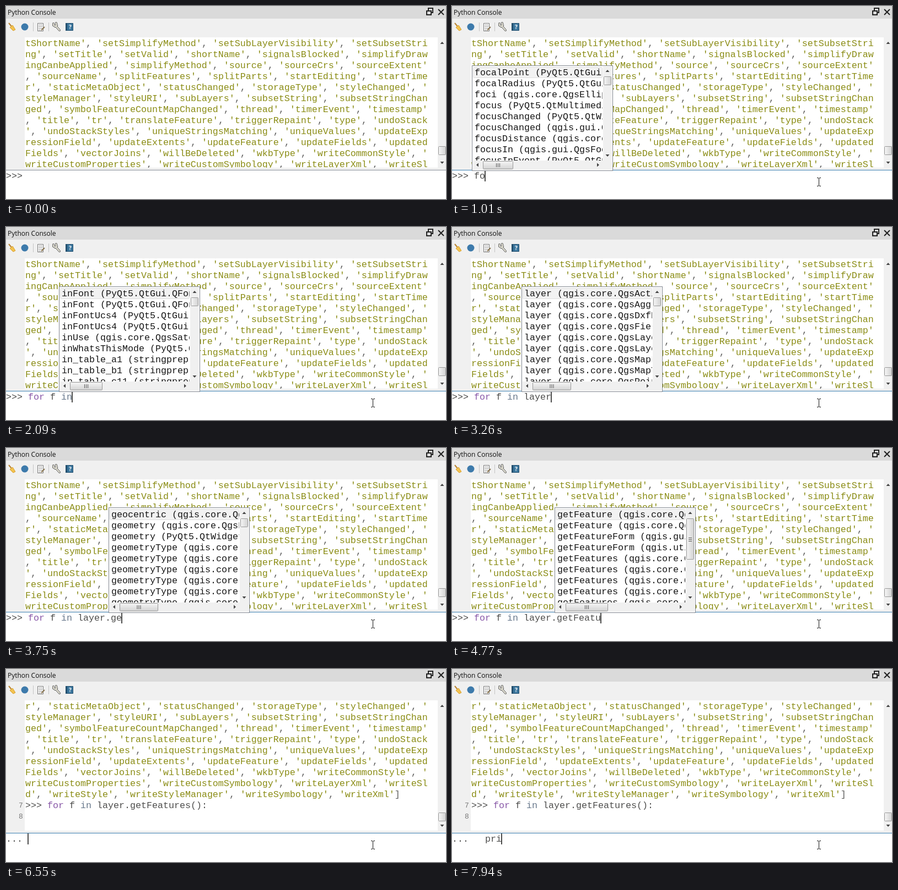
Write an HTML page that moves like this. It is 798 px wide and 351 px high and loops after 8 s.

```html
<!DOCTYPE html>
<html lang="en">
<head>
<meta charset="utf-8">
<title>Python Console</title>
<style>
html, body { margin: 0; width: 100%; height: 100%; overflow: hidden; background: #fff; }
svg { display: block; }
text { font: 16.664px "Liberation Mono", "Courier New", monospace; white-space: pre; fill: #4d4d4c; }
.ui { font: 12px "Open Sans", "Noto Sans", sans-serif; fill: #111; }
.num { font-size: 13px; fill: #777; }
.str { fill: #8a8c14; }
.op { fill: #5c5c5b; }
.kw { fill: #8959a8; }
.in { fill: #68788c; }
.bad { fill: #f00; }
.match { fill: #00f; }
.item { fill: #161616; }
.tip { fill: #8c8c8c; }
</style>
</head>
<body>
<svg width="798" height="351" viewBox="0 0 798 351">
  <defs>
    <linearGradient id="thumbV"><stop stop-color="#f6f6f6"/><stop offset="1" stop-color="#d2d2d2"/></linearGradient>
    <linearGradient id="thumbH" x2="0" y2="1"><stop stop-color="#f6f6f6"/><stop offset="1" stop-color="#d2d2d2"/></linearGradient>
    <clipPath id="page"><path d="M0 57H783V294H0z"/></clipPath>
    <clipPath id="rows"><path d="M2 2H237V173H2z"/></clipPath>
  </defs>
  <path fill="#f0f0f0" d="M0 0H798V298H0z"/>
  <path fill="#dadada" d="M0 0H798V23H0z"/>
  <text class="ui" x="3" y="16">Python Console</text>
  <g fill="none" stroke="#222" stroke-width="2">
    <path d="M766 8V4H774V12H771M763 9H771V16H763z"/>
    <path d="M784 6L794 16M794 6L784 16"/>
  </g>
  <!-- toolbar -->
  <path d="M5 31L10 37" stroke="#b98432" stroke-width="2"/>
  <path fill="#f2c250" stroke="#d9a02c" d="M7 39L12 35L17 43L13 45z"/>
  <circle cx="34" cy="38" r="6.5" fill="#3d7aab"/>
  <path stroke="#c4c4c4" d="M49.5 30V46M77.5 30V46"/>
  <path fill="#fff" stroke="#777" d="M57.5 31.5H67.5V45.5H57.5z"/>
  <path stroke="#999" d="M59 34.5H66M59 37.5H66M59 40.5H66M59 43.5H63"/>
  <path stroke="#8a7550" stroke-width="2" d="M64 44L70 38"/>
  <g fill="none" stroke-linecap="round">
    <path stroke="#666" stroke-width="4" d="M90 36L97 44M86 32V35L89 37L92 35L91 31"/>
    <path stroke="#e8e6d8" stroke-width="2" d="M90 36L97 44M86 32V35L89 37L92 35L91 31"/>
  </g>
  <path fill="#3a759c" stroke="#24506f" d="M108.5 31.5H121.5V44.5H108.5z"/>
  <path fill="#24506f" d="M108 31H111V45H108z"/>
  <text class="ui" x="114" y="42" style="fill:#fff;font-size:10px;font-weight:bold">?</text>
  <!-- output and input -->
  <path fill="#fff" d="M34 57H783V294H34zM0 298H798V351H0z"/>
  <g id="view"></g>
</svg>
<script>
const names = `tShortName setSimplifyMethod setSubLayerVisibility setSubsetString setTitle setValid shortName
signalsBlocked simplifyDrawingCanbeApplied simplifyMethod source sourceCrs sourceExtent sourceName splitFeatures
splitParts startEditing startTimer staticMetaObject statusChanged storageType styleChanged styleManager styleURI
subLayers subsetString subsetStringChanged symbolFeatureCountMapChanged thread timerEvent timestamp title tr
translateFeature triggerRepaint type undoStack undoStackStyles uniqueStringsMatching uniqueValues
updateExpressionField updateExtents updateFeature updateFields updatedFields vectorJoins willBeDeleted wkbType
writeCommonStyle writeCustomProperties writeCustomSymbology writeLayerXml writeSld writeStyle writeStyleManager
writeSymbology writeXml`;
const lines = (names.split(/\s+/).join("', '") + "']").match(/.{1,73}/g);

const rep = (s, n) => Array(n).fill(s);
const core = (name, classes) => classes.split(' ').map(c => `${name} (qgis.core.Qgs${c}`);
const layers = core('layer', 'Acti Aggr DxfE Fiel Laye Laye MapL MapT Poin');
const features = rep('getFeatures (qgis.core.Qg', 9);
const feature = [...rep('getFeature (qgis.core.Qgs', 2), 'getFeatureForm (qgis.gui.', 'getFeatureForm (qgis.util', ...features.slice(4)];

// completion lists: rows, vertical and horizontal thumb lengths
const lists = {
  fo: [['focalPoint (PyQt5.QtGui.', 'focalRadius (PyQt5.QtGui', 'foci (qgis.core.QgsEllip', 'focus (PyQt5.QtMultimedi',
    'focusChanged (PyQt5.QtWi', 'focusChanged (qgis.gui.Q', 'focusDistance (qgis.core', 'focusIn (qgis.gui.QgsFoc', 'focusInEvent (PyQt5.QtGu'], 16, 55],
  for: [['forceActiveFocus (PyQt5.', 'forceLocalOptimization (', 'forceRHR (qgis.core.QgsG', 'foreground (PyQt5.QtGui.',
    'foreground (PyQt5.QtWidg', 'foregroundRole (PyQt5.Qt', 'forget (PyQt5.QtCore.QOb', 'fork (os)', 'format (PyQt5.QtGui.QIma'], 16, 55],
  in: [['inFont (PyQt5.QtGui.QFon', 'inFont (PyQt5.QtGui.QFon', 'inFontUcs4 (PyQt5.QtGui.', 'inFontUcs4 (PyQt5.QtGui.',
    'inUse (qgis.core.QgsSate', 'inWhatsThisMode (PyQt5.Q', 'in_table_a1 (stringprep)', 'in_table_b1 (stringprep)', 'in_table_c11 (stringprep'], 16, 59],
  la: [core('label', 'Acti Colo Diag Feat Lege Pal Rule Sett Text'), 16, 59],
  layer: [layers, 16, 70],
  ge: [['geocentric (qgis.core.Qg', 'geometry (qgis.core.QgsF', 'geometry (PyQt5.QtWidget', ...core('geometryType', 'Abst Feat Geom Vect Wkb Wms')], 16, 70],
  get: [core('getAttribute', 'Acti Expr Feat Laye Map Proj Rast Vect Xml'), 16, 70],
  getF: [['getFactory (qgis.core.Qg', 'getFeat (qgis.core.QgsVe', ...feature.slice(0, 7)], 60, 77],
  getFeatu: [feature, 75, 77],
  getFeatures: [features, 90, 77]
};

// time, typed text, completion list
const loop = 'for f in ', get = loop + 'layer.get', call = get + 'Features';
const steps = [
  [0, ''], [850, 'f'], [930, 'fo'], [1010, 'fo', 'fo'], [1080, 'for', 'fo'], [1160, 'for', 'for'], [1240, 'for '],
  [1700, 'for f'], [1850, 'for f '], [1960, 'for f i'], [2090, 'for f in', 'in'], [2170, loop],
  [2720, loop + 'l'], [2830, loop + 'la', 'la'], [2930, loop + 'lay', 'layer'], [3050, loop + 'laye', 'layer'],
  [3260, loop + 'layer', 'layer'], [3430, loop + 'layer.'], [3590, loop + 'layer.g'], [3750, loop + 'layer.ge', 'ge'],
  [3820, get, 'get'], [4050, get + 'F', 'getF'], [4250, get + 'Fe', 'getFeatu'], [4420, get + 'Fea', 'getFeatu'],
  [4600, get + 'Feat', 'getFeatu'], [4770, get + 'Featu', 'getFeatu'], [4920, get + 'Featur', 'getFeatu'],
  [5080, get + 'Feature', 'getFeatu'], [5250, call, 'getFeatures'], [5550, call + '('], [5780, call + '()'], [6240, call + '():'],
  [6550, ''], [7010, ' '], [7390, '  '], [7700, '  p'], [7820, '  pr'], [7940, '  pri']
];
const mouse = [[70, 690, 329], [160, 676, 325], [270, 665, 320]];

const at = (list, t) => list.filter(s => s[0] <= t).pop();
const text = (x, y, s, cls = '') => `<text x="${x}" y="${y}" class="${cls}">${s}</text>`;
const span = (cls, s) => `<tspan class="${cls}">${s}</tspan>`;
const box = (x, y, w, h, fill, stroke, r = 1) =>
  `<rect x="${x + .5}" y="${y + .5}" width="${w - 1}" height="${h - 1}" rx="${r}" fill="${fill}" stroke="${stroke}"/>`;
const arrow = (x, y, turn, fill = '#444') =>
  `<path d="M-3.5 2L0 -2L3.5 2z" fill="${fill}" transform="translate(${x} ${y}) rotate(${turn})"/>`;
const thumbV = (x, y, h) => box(x, y, 14, h, 'url(#thumbV)', '#999') +
  (h > 30 ? `<path stroke="#555" d="M${x + 4} ${y + h / 2 - 2}h6m-6 3h6m-6 3h6"/>` : '');
const thumbH = (x, y, w) => box(x, y, w, 15, 'url(#thumbH)', '#999') +
  `<path stroke="#555" d="M${x + w / 2 - 3} ${y + 4}v7m3 -7v7m3 -7v7"/>`;

const code = s => s
  .replace(/\(\)$/, span('match', '()'))
  .replace(/\($/, span('bad', '('))
  .replace(/ in\b/, ' ' + span('in', 'in'))
  .replace(/^for\b/, span('kw', 'for'));

function output(done) {
  const rows = lines.slice(done ? 4 : 0, done ? 13 : 12)
    .map((s, i) => text(35, 73 + 20 * i, s.replace(/[,\]]/g, c => span('op', c)), 'str')).join('');
  const entered = done ? text(35, 253, '&gt;&gt;&gt; ' + code(call + '():')) + text(23, 252, 7, 'num') + text(23, 272, 8, 'num') : '';
  return `<g clip-path="url(#page)">${rows}${entered}</g>` +
    arrow(791, 67, 0) + arrow(791, 285, 180) + thumbV(784, done ? 261 : 255, 16);
}

function popup(x, [rows, v, h]) {
  return `<g transform="translate(${x} 108)">` + box(0, 0, 256, 192, '#fff', '#828790', 0) +
    '<path fill="#f0f0f0" d="M238 2H254V190H2V173H238z"/>' +
    `<g clip-path="url(#rows)">${box(2, 3, 235, 20, '#f2f2f2', '#dedede')}` +
    rows.map((s, i) => text(5, 18 + 20 * i, s, 'item')).join('') + '</g>' +
    arrow(246, 10, 0) + arrow(246, 164, 180) + thumbV(239, 20, v) +
    arrow(10, 181, -90) + arrow(229, 181, 90) + thumbH(20, 174, h) + '</g>';
}

const callTip = () => box(172, 322, 640, 21, '#fff', '#555', 0) + '<path fill="#666" d="M177 323H189V342H177z"/>' +
  arrow(183, 332, 180, '#fff') +
  text(191, 337, 'getFeatures(QgsFeatureRequest request=QgsFeatureRequest()) -&gt;', 'tip');

function draw(t) {
  const [, typed, list] = at(steps, t), done = t >= 6550, pos = at(mouse, t);
  const caret = t >= 400 && !(t >= 6700 && t < 7010);
  let out = output(done) + `<path stroke="${t < 400 ? '#8a9099' : '#3c7fb1'}" d="M0 298.5H798"/>` +
    text(0, 314, (done ? '...' : '&gt;&gt;&gt;') + ' ' + code(typed));
  if (caret) out += `<rect x="${39 + 10 * typed.length}" y="299" width="2" height="20" fill="#4d4d4c"/>`;
  if (list) {
    const start = typed.search(/\w+$/);
    out += popup(36 + 10 * start, lists[list]);
  }
  if (typed.endsWith('(')) out += callTip();
  if (pos) out += `<path fill="none" stroke="#111" transform="translate(${pos[1]} ${pos[2]})" d="M-3 -7.5H-1L.5 -6.5L2 -7.5H4M.5 -6.5V6.5M-3 7.5H-1L.5 6.5L2 7.5H4"/>`;
  return out;
}

const view = document.getElementById('view');
const begin = performance.now();
let shown;
function tick() {
  const next = draw((performance.now() - begin) % 8000);
  if (next !== shown) view.innerHTML = shown = next;
  requestAnimationFrame(tick);
}
tick();
</script>
</body>
</html>
```
